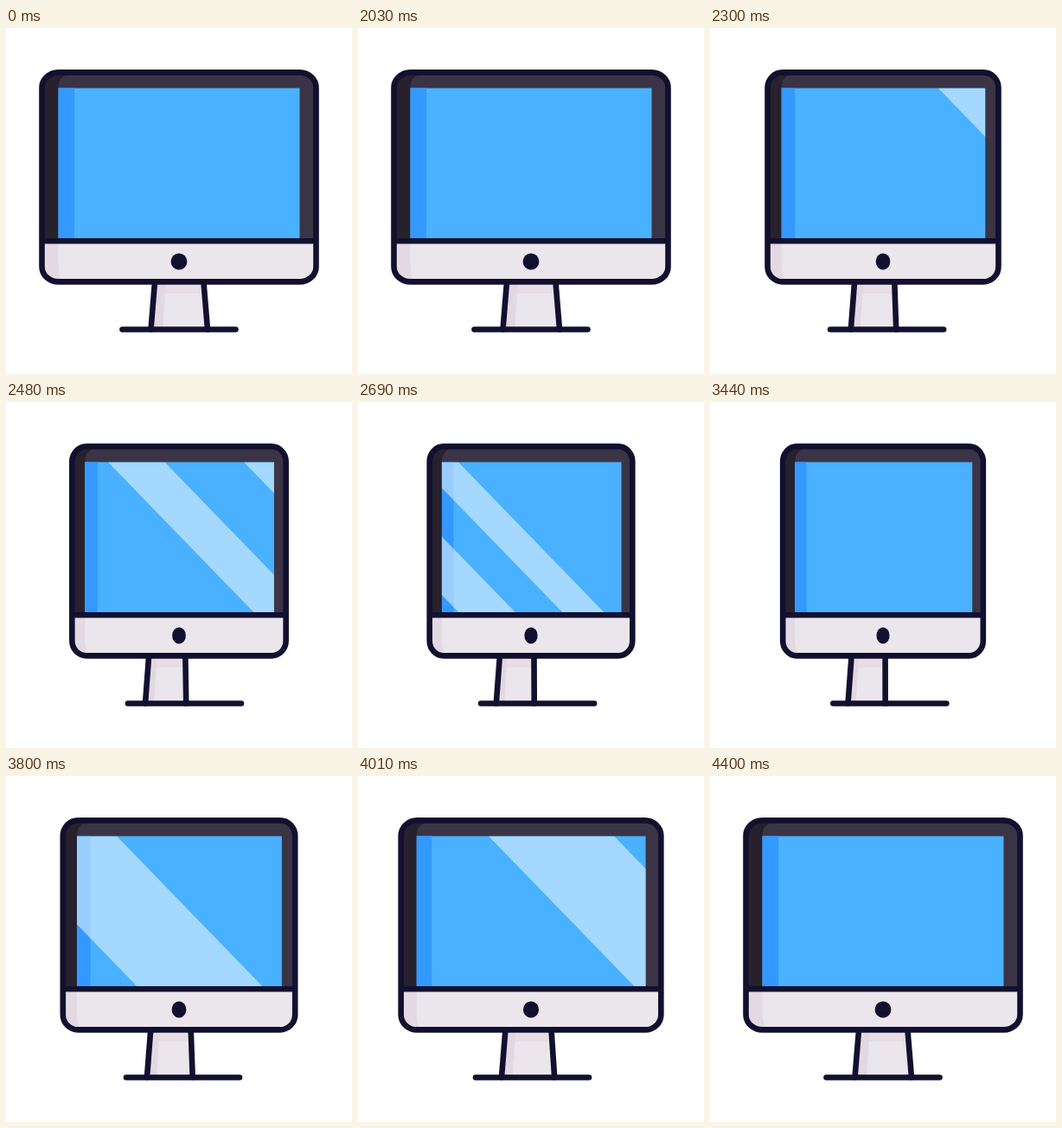
These frames come from a looping animation (400x400 px, 4430 ms). An HTML page:

```html
<!DOCTYPE html>
<html lang="en">
<head>
<meta charset="utf-8">
<title>Turning monitor</title>
<style>
  html, body { margin: 0; width: 100%; height: 100%; overflow: hidden; background: #fff; }
  svg { display: block; width: 100vw; height: 100vh; }
  .ink { fill: none; stroke: #12102f; stroke-width: 6.6; stroke-linecap: round; stroke-linejoin: round; }
</style>
</head>
<body>
<svg viewBox="0 0 400 400">
  <defs>
    <clipPath id="bodyClip"><rect id="bodyShape" y="51.4" height="242" ry="17.5"/></clipPath>
    <clipPath id="screenClip"><rect id="screenShape" y="69.5" height="174.5"/></clipPath>
    <clipPath id="standClip"><path id="standShape"/></clipPath>
  </defs>

  <g clip-path="url(#standClip)">
    <rect x="100" y="290" width="200" height="60" fill="#ebe5ec"/>
    <rect x="100" y="290" width="200" height="17" fill="#e6dde5"/>
    <path id="standShade" fill="#e1d8e1"/>
  </g>
  <path id="standLine" class="ink"/>
  <path id="base" class="ink"/>

  <g clip-path="url(#bodyClip)">
    <rect width="400" height="246" fill="#3b3446"/>
    <path id="frameShade" fill="#26212d"/>
    <rect y="246" width="400" height="60" fill="#ebe5ec"/>
    <path id="chinShade" fill="#e2d9e3"/>
  </g>
  <g clip-path="url(#screenClip)">
    <rect width="400" height="300" fill="#49b1ff"/>
    <rect id="strip" y="60" height="200" fill="#3399ff"/>
    <g fill="#fff" fill-opacity=".5">
      <path id="glareA"/>
      <path id="glareB"/>
      <path id="glareC"/>
    </g>
  </g>
  <rect id="bodyLine" class="ink" y="51.4" height="242" ry="17.5"/>
  <path id="divider" class="ink"/>
  <ellipse id="button" cx="200" cy="270" ry="9.4" fill="#12102f"/>
</svg>
<script>
const LOOP = 4430, START = 2030, BACK = 3215, STEP = 30;
const $ = id => document.getElementById(id);
const set = (id, attrs) => {
  for (const k in attrs) $(id).setAttribute(k, attrs[k]);
};

// Symmetric cubic-bezier(a, 0, 1 - a, 1)
function easeInOut(x, a) {
  let lo = 0, hi = 1;
  for (let i = 0; i < 30; i++) {
    const s = (lo + hi) / 2, r = 1 - s;
    const v = 3 * a * s * r * r + 3 * (1 - a) * s * s * r + s * s * s;
    if (v < x) lo = s; else hi = s;
  }
  return lo * lo * (3 - 2 * lo);
}

// 0 faces the viewer, 1 is fully turned
function turn(t) {
  if (t < START) return 0;
  if (t < BACK) return 1 - Math.pow(1 - (t - START) / (BACK - START), 3.2);
  return 1 - easeInOut((t - BACK) / (LOOP - BACK), 0.6);
}

// Slanted band; u is its left edge at the top of the screen
function glare(id, u, w, on) {
  const slant = 175 * 0.97;
  set(id, { d: on ? `M${u} 69.5h${w}l${slant} 175h${-w}z` : "" });
}

function draw(t) {
  const p = turn(t);
  const mix = (a, d) => a + d * p;

  const left = mix(41.5, 44.5), right = 400 - left;
  const body = { x: left, width: right - left, rx: mix(19, -3) };
  set("bodyShape", body);
  set("bodyLine", body);
  set("divider", { d: `M${left + 3} 246.3H${right - 3}` });
  set("button", { rx: mix(9.4, -1.9) });

  const sl = mix(60.5, 39.3), sr = mix(339.5, -37.8);
  set("screenShape", { x: sl, width: sr - sl });
  set("strip", { x: sl, width: mix(18.5, -5.2) });
  set("frameShade", { d: `M0 40H${sl + 10}V54Q${sl} 57 ${sl} 70V246H0z` });
  set("chinShade", { d: `M0 249H${sl}V276Q${sl} 288 ${sl + 6} 292H0z` });

  const lt = mix(172, -8.8), lb = mix(167.5, -8.3);
  const rt = mix(228.5, -27), rb = mix(233, -31.6);
  set("standShape", { d: `M${lt} 294L${lb} 348.5H${rb}L${rt} 294z` });
  set("standLine", { d: `M${lt} 294L${lb} 348.5M${rt} 294L${rb} 348.5` });
  const shade = mix(184, -13);
  set("standShade", { d: `M100 290H${shade + 1}L${shade - 3} 349H100z` });
  set("base", { d: `M${mix(134.5, 8.2)} 348.5h131` });

  const out = t >= START && t < BACK;
  glare("glareA", 118 - 0.81 * (t - 2480), 65.5, out);
  glare("glareB", 275 - 0.986 * (t - 2480), 48, out);
  glare("glareC", -17 + 0.8 * (t - 3800), 145, t >= BACK);
}

function tick() {
  let t = performance.now() % LOOP;
  t = t < START ? 0 : START + Math.floor((t - START) / STEP) * STEP;
  draw(t);
  requestAnimationFrame(tick);
}
tick();
</script>
</body>
</html>
```
